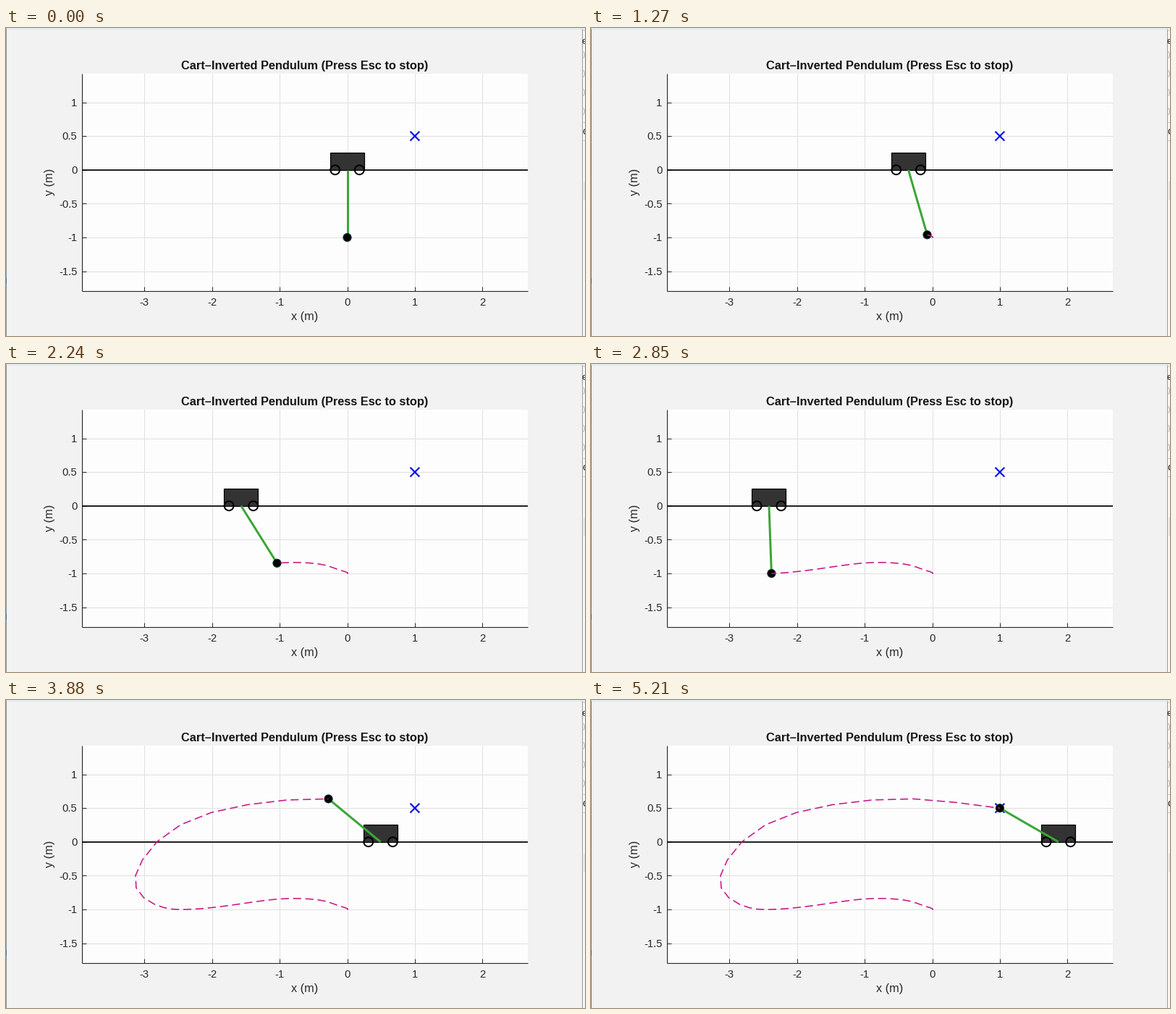
A matplotlib script that plays this animation: 800x425 px, repeating every 5520 ms.

```python
import numpy as np
import matplotlib.pyplot as plt
from matplotlib.animation import FuncAnimation
from matplotlib.patches import Circle, Rectangle

W, H, DPI = 800, 425, 100
LOOP, STEP = 5520, 20
PT = 72 / DPI                       # points per pixel
LEFT, RIGHT, TOP, BOTTOM = 104.5, 720.5, 62.5, 363
INK, GRID = "#262626", "#dfdfdf"

plt.rcParams["font.family"] = "Liberation Sans"


def px(x):
    return 471.5 + 93.4 * x


def py(y):
    return 195.8 - 93.25 * y


# Key poses: simulation step, cart position (m), angle from straight down (rad)
KEYS = np.array([
    (0, 0, 0), (10, -.353, .282), (16, -.925, .535), (22, -1.57, .56),
    (32, -2.415, .037), (36, -2.48, -.23), (40, -2.262, -1.053),
    (44, -1.108, -2.021), (47, .493, -2.261), (49, 1.866, -2.094),
])

# Playback runs at an even pace between stalls: first ms, last ms, steps
RUNS = [(0, 0, 1), (640, 1060, 8), (1210, 1330, 3), (1490, 1700, 4),
        (1850, 2390, 10), (2490, 3030, 10), (3060, 3580, 9), (3640, 4060, 5)]
ticks = np.concatenate([np.linspace(*run) for run in RUNS])


def hermite(n, xs, ys):
    """Smooth cubic curve through the keys, starting at rest."""
    slope = np.gradient(ys, xs)
    slope[0] = 0
    i = np.clip(np.searchsorted(xs, n, side="right") - 1, 0, len(xs) - 2)
    h = xs[i + 1] - xs[i]
    u = (n - xs[i]) / h
    return ((1 + 2 * u) * (1 - u) ** 2 * ys[i] + u * (1 - u) ** 2 * h * slope[i]
            + u * u * (3 - 2 * u) * ys[i + 1] + u * u * (u - 1) * h * slope[i + 1])


steps = np.arange(len(ticks))
cart_m, theta = (hermite(steps, KEYS[:, 0], KEYS[:, k]) for k in (1, 2))
cart_x = px(cart_m)
bob_x = px(cart_m + np.sin(theta))
bob_y = py(-np.cos(theta))

fig = plt.figure(figsize=(W / DPI, H / DPI), dpi=DPI, facecolor="#f2f2f2")
ax = fig.add_axes([0, 0, 1, 1])
ax.set_xlim(0, W)
ax.set_ylim(H, 0)
ax.axis("off")


def line(xs, ys, color, width, z, **kw):
    return ax.plot(xs, ys, color=color, lw=width * PT, zorder=z,
                   solid_capstyle="butt", **kw)[0]


def vline(x, y0, y1, color, width=1, z=1):
    line([x, x], [y0, y1], color, width, z)


def hline(y, x0, x1, color, width=1, z=1):
    line([x0, x1], [y, y], color, width, z)


def label(x, y, s, size, color=INK, ha="center", **kw):
    ax.text(x, y, s, fontsize=size * PT, va="baseline", color=color, ha=ha, **kw)


def rect(x, y, w, h, color, z=0, lw=0, **kw):
    return ax.add_patch(Rectangle((x, y), w, h, fc=color, lw=lw, zorder=z, **kw))


def draw_window():
    rect(797, 0, 3, H, "#f6f6f6")
    rect(798, 212, 2, 25, "#e4e4e4")
    vline(796.4, 0, H, "#9a9a9a")
    vline(.4, 0, H, "#8c8c8c")
    vline(.4, 345, 352, "#3f78b5", z=2)
    hline(.5, 0, W, "#dedede")
    for y in (2.5, 129.5, 154.5):
        hline(y, 797, W, "#c4c4c4")
    label(796, 22, "e", 13, ha="left")
    label(796.5, 147, "c", 15, ha="left")
    for y in range(40, 120, 26):
        label(796.5, y, ")", 10, color="#a8a8a8", ha="left")


def draw_axes():
    rect(LEFT, TOP, RIGHT - LEFT, BOTTOM - TOP, "#fefdfe")
    for v in range(-3, 3):
        x = px(v)
        vline(x, TOP, BOTTOM, GRID)
        vline(x, BOTTOM - 6, BOTTOM, INK, z=2)
        label(x, 383, str(v), 14.8)
    for v in np.arange(-1.5, 1.1, .5):
        y = py(v)
        hline(y, LEFT, RIGHT, GRID)
        hline(y, LEFT, LEFT + 6, INK, z=2)
        label(98.5, y + 5.2, f"{v:g}", 14.8, ha="right")
    vline(LEFT, TOP, BOTTOM, INK, 1.1, 2)
    hline(BOTTOM, LEFT, RIGHT, INK, 1.1, 2)
    hline(py(0), LEFT, RIGHT, "black", 1.7, 3)
    label(412.4, 56.8, "Cart–Inverted Pendulum (Press Esc to stop)", 16.32,
          color="#161616", weight="bold")
    label(413, 402.5, "x (m)", 16.25)
    label(65, 212.5, "y (m)", 16.25, rotation=90, rotation_mode="anchor")


draw_window()
draw_axes()

# Target cross
tx, ty, arm = px(1), py(.5), 6.4
for s in (1, -1):
    line([tx - arm, tx + arm], [ty - s * arm, ty + s * arm], "#1010e6", 2.2, 4)

CART_W, WHEEL = 47, 16.8
cart = rect(0, py(.25), CART_W, py(0) - py(.25), "#333333", 5, 1.2 * PT,
            ec="black")
wheels = [ax.add_patch(Circle((0, py(0)), 6.4, fc="none", ec="black",
                              lw=2 * PT, zorder=6)) for _ in range(2)]
rod = line([], [], "#3aa636", 3, 7)
bob = ax.add_patch(Circle((0, 0), 5.6, fc="black", ec="#0d3a33",
                          lw=PT, zorder=8))
trail = line([], [], "#c8198a", 1.6, 9, linestyle=(0, (7, 3.6)),
             dash_capstyle="butt")


def update(frame):
    t = frame * STEP + STEP / 2
    n = np.searchsorted(ticks, t, side="right") - 1
    x = cart_x[n]
    cart.set_x(x - CART_W / 2)
    for wheel, side in zip(wheels, (-1, 1)):
        wheel.center = x + side * WHEEL, py(0)
    rod.set_data([x, bob_x[n]], [py(0), bob_y[n]])
    bob.center = bob_x[n], bob_y[n]
    trail.set_data(bob_x[:n + 1], bob_y[:n + 1])
    return cart, *wheels, rod, bob, trail


anim = FuncAnimation(fig, update, frames=LOOP // STEP, interval=STEP,
                     repeat=True, repeat_delay=0)
plt.show()
```
